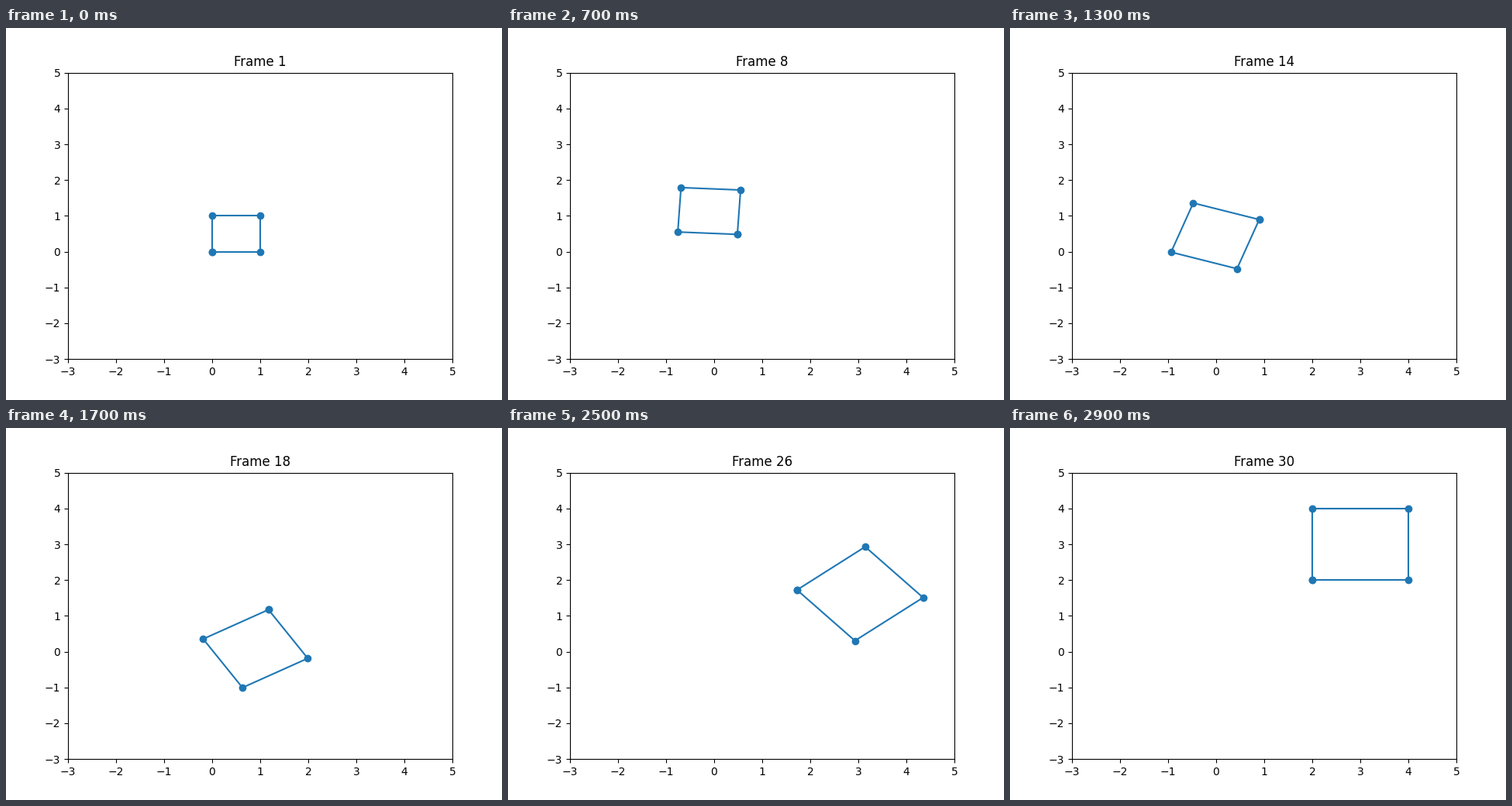
A matplotlib script for the animation above (3000 ms loop, 640 px wide and 480 px high).

```python
import numpy as np
import matplotlib.pyplot as plt
from matplotlib.animation import FuncAnimation

FRAMES = 30
SQUARE = np.array([[0, 1, 1, 0, 0],
                   [0, 0, 1, 1, 0]], dtype=float)

fig, ax = plt.subplots(figsize=(6.4, 4.8), dpi=100)
ax.set_xlim(-3, 5)
ax.set_ylim(-3, 5)
title = ax.set_title("Frame 1")
line, = ax.plot([], [], "o-", color="tab:blue")


def transform(t):
    """Scale, turn and shift the square; t runs from 0 to 1."""
    angle = 2 * np.pi * t
    c, s = np.cos(angle), np.sin(angle)
    rotation = np.array([[c, -s], [s, c]])
    return (1 + t) * rotation @ SQUARE + 2 * t


def update(i):
    line.set_data(*transform(i / (FRAMES - 1)))
    title.set_text(f"Frame {i + 1}")
    return line, title


anim = FuncAnimation(fig, update, frames=FRAMES, interval=100,
                     repeat=True, repeat_delay=0)
plt.show()
```
